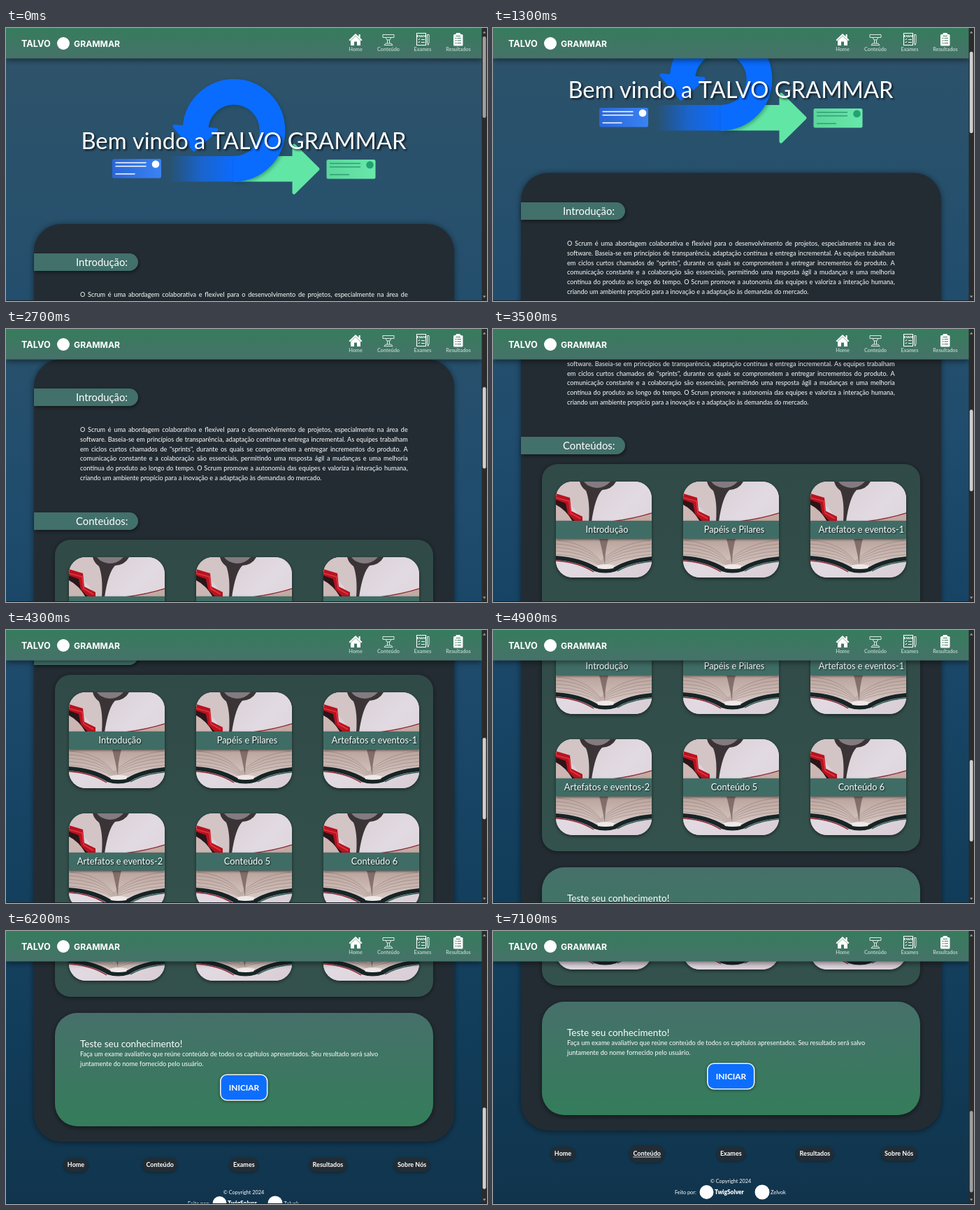
An HTML page with a canvas for the animation above (8.4 s loop, 688x390 px).

```html
<!DOCTYPE html>
<html lang="pt">
<head>
<meta charset="utf-8">
<title>Talvo Grammar</title>
<style>
html, body { margin: 0; width: 100%; height: 100%; overflow: hidden; background: #232c33; }
canvas { display: block; }
</style>
</head>
<body>
<canvas id="stage" width="688" height="390"></canvas>
<script>
const ctx = document.getElementById('stage').getContext('2d');
const W = 688, H = 390, PAGE_H = 1208, LOOP = 8400, STEP = 100;
const DARK = '#232c33', TEAL = '#46706a', GREEN = '#347d5b', WHITE = '#fff';
const LATO = 'Lato, sans-serif';

// Scroll offset over time, linear between the points
const SCROLL = [[620, 0], [1300, 73], [2700, 237], [3500, 345], [4300, 474], [5600, 704], [6300, 818]];

function scrollAt(t) {
  if (t <= SCROLL[0][0]) return 0;
  for (let i = 1; i < SCROLL.length; i++) {
    const [t0, y0] = SCROLL[i - 1], [t1, y1] = SCROLL[i];
    if (t <= t1) return Math.round(y0 + (y1 - y0) * (t - t0) / (t1 - t0));
  }
  return 818;
}

function shadow(blur, dx = 0, dy = 0, color = 'rgba(0,0,0,.5)') {
  ctx.shadowColor = color;
  ctx.shadowBlur = blur;
  ctx.shadowOffsetX = dx;
  ctx.shadowOffsetY = dy;
}

const noShadow = () => shadow(0, 0, 0, 'transparent');

function text(str, x, y, size, { weight = 400, align = 'left', color = WHITE, font = LATO } = {}) {
  ctx.font = `${weight} ${size}px ${font}`;
  ctx.textAlign = align;
  ctx.fillStyle = color;
  ctx.fillText(str, x, y);
  return ctx.measureText(str).width;
}

function justified(str, x, y, size, width) {
  ctx.font = `400 ${size}px ${LATO}`;
  const gap = (width - ctx.measureText(str).width) / (str.split(' ').length - 1);
  ctx.wordSpacing = gap + 'px';
  text(str, x, y, size);
  ctx.wordSpacing = '0px';
}

function box(x, y, w, h, r, fill) {
  ctx.beginPath();
  ctx.roundRect(x, y, w, h, r);
  ctx.fillStyle = fill;
  ctx.fill();
}

function disc(x, y, r, fill) {
  ctx.beginPath();
  ctx.arc(x, y, r, 0, 7);
  ctx.fillStyle = fill;
  ctx.fill();
}

function shape(d, fill, stroke, width = 1) {
  const p = new Path2D(d);
  if (fill) { ctx.fillStyle = fill; ctx.fill(p); }
  if (stroke) { ctx.strokeStyle = stroke; ctx.lineWidth = width; ctx.stroke(p); }
}

function fade(x0, y0, x1, y1, ...colors) {
  const g = ctx.createLinearGradient(x0, y0, x1, y1);
  colors.forEach((c, i) => g.addColorStop(i / (colors.length - 1), c));
  return g;
}

function ticket(x, y, fill, line, dot) {
  box(x, y, 70, 27.5, 2.5, fill);
  shape(`M${x + 4.5} ${y + 5.5}h44m-44 5h44m-44 11h28`, null, line, 1.6);
  disc(x + 62, y + 7.5, 5.3, dot);
}

function hero() {
  const blue = '#0a6bff', mint = '#62e6a5';
  ctx.lineJoin = ctx.lineCap = 'round';
  shape('M326 183H411V168L446 201.5L411 235V219.500H326Z', mint);
  shape('M412 168L446 201.500L412 235Z', mint, mint, 5);
  ctx.lineCap = 'butt';

  ctx.fillStyle = fade(233, 0, 326, 0, 'rgba(10,107,255,0)', 'rgba(20,108,245,.7)', blue);
  ctx.fillRect(233, 183, 94, 36.5);
  shadow(5, 2, 2, 'rgba(0,60,60,.4)');
  ctx.beginPath();
  ctx.arc(326, 146.2, 55, Math.PI, Math.PI / 2);
  ctx.strokeStyle = blue;
  ctx.lineWidth = 36.6;
  ctx.stroke();
  noShadow();
  shape('M241 140.500L301 145.500L269 174Z', blue, blue, 5);

  ticket(152, 187, fade(152, 0, 222, 0, '#2a66d8', '#3a82f2'), WHITE, WHITE);
  ticket(458.5, 188, fade(458, 0, 528, 0, '#5bd69b', '#69e8ab'), '#2f9c72', '#24a073');

  shadow(3, 2, 2, 'rgba(0,0,0,.7)');
  text('Bem vindo a TALVO GRAMMAR', 340, 172.5, 32.7, { align: 'center' });
  noShadow();
}

function heading(label, y) {
  shadow(5, 1, 2);
  box(40, y, 149, 25, [0, 12.5, 12.5, 0], '#42706a');
  noShadow();
  text(label, 100, y + 17.5, 14.8);
}

function books() {
  ctx.fillStyle = fade(0, 0, 137, 137, '#d6cbd0', '#e2dae2', '#d9cdd4');
  ctx.fillRect(0, 0, 137, 137);
  // upper volume
  shape('M0 0H38Q44 12 49 18V57H36Q30 34 0 19Z', '#d3c4c6');
  shape('M34 0H86Q80 11 66 12Q56 22 51 57H47Q49 28 43 13Q36 8 34 0Z', '#3b3436');
  shape('M40 0H78Q70 9 58 9Q46 8 40 0Z', '#837b7f');
  shape('M0 17L20 23L22 42L38 50V57H0Z', '#b8131f');
  shape('M0 26L14 31L17 46L28 57H0Z', '#2b1519');
  shape('M0 33Q14 40 24 57H0Z', '#cbb6b4');
  shape('M0 23L19 28L21 45L35 53', null, '#e23540', 1.5);
  shape('M84 57Q112 54 137 46V57Z', '#c4aaa2');
  shape('M80 57Q112 53 137 45', null, '#8f3038', 1.4);
  // lower volume
  shape('M0 80H137V107Q104 109 84 121H58Q34 108 0 106Z', fade(0, 82, 0, 122, '#b9a39c', '#d8c8c3'));
  for (let i = 0; i < 5; i++) {
    shape(`M0 ${84 + i * 5}Q42 ${86 + i * 5} 64 ${114 + i * 1.5}Q92 ${87 + i * 5} 137 ${84 + i * 5}`, null, 'rgba(95,72,70,.35)', .8);
  }
  shape('M62 82H75Q70 98 70 119Q66 96 62 82Z', 'rgba(70,50,50,.5)');
  shape('M0 106Q34 108 58 122Q70 126 84 122Q104 110 137 107V113Q104 116 86 128Q70 133 55 128Q32 114 0 112Z', '#172426');
  shape('M58 120Q70 116 84 120L82 124Q70 126 60 124Z', '#efe8e6');
  shape('M0 113Q32 115 54 129', null, '#8e2430', 1.4);
  shape('M88 128Q106 117 137 114', null, '#28584f', 1.4);
}

function topic(label, x, y) {
  shadow(5, 0, 2);
  box(x, y, 137, 137, 24, '#d9cdd4');
  noShadow();
  ctx.save();
  ctx.beginPath();
  ctx.roundRect(x, y, 137, 137, 24);
  ctx.clip();
  ctx.translate(x, y);
  books();
  shadow(3, 0, 1);
  ctx.fillStyle = '#3f6d66';
  ctx.fillRect(0, 56, 137, 25.5);
  shadow(2, 1, 1, 'rgba(0,0,0,.8)');
  text(label, 73, 73, 12.8, { align: 'center' });
  ctx.restore();
}

function quiz() {
  shadow(7, 0, 2);
  box(70, 919, 541, 162, 32, fade(0, 919, 0, 1081, TEAL, GREEN));
  noShadow();
  text('Teste seu conhecimento!', 106, 967.7, 13.5);
  text('Faça um exame avaliativo que reúne conteúdo de todos os capítulos apresentados. Seu resultado será salvo', 106, 981.4, 9.1);
  text('juntamente do nome fornecido pelo usuário.', 106, 995, 9.1);
  shadow(4, 0, 1);
  box(306, 1006.5, 68.5, 38, 10, '#eef6f4');
  noShadow();
  box(307.6, 1008.1, 65.3, 34.8, 8.5, '#0d6efd');
  text('INICIAR', 340.5, 1029.8, 11.9, { weight: 700, align: 'center' });
}

function footer(hover) {
  ['Home', 'Conteúdo', 'Exames', 'Resultados', 'Sobre Nós'].forEach((label, i) => {
    const x = 100 + i * 120.15, on = hover && i === 1;
    ctx.font = `700 9px ${LATO}`;
    const w = ctx.measureText(label).width, h = on ? 24 : 20;
    shadow(4, 0, 1, 'rgba(0,0,0,.35)');
    box(x - w / 2 - 5, 1136.3 - h / 2, w + 10, h, h / 2, DARK);
    noShadow();
    text(label, x, 1139.3, 9, { weight: 700, align: 'center' });
    if (on) ctx.fillRect(x - w / 2, 1140.5, w, .8);
  });
  text('© Copyright 2024', 340, 1178, 7.3, { align: 'center' });
  text('Feito por:', 260, 1193.5, 7.3);
  disc(305.5, 1191, 10, WHITE);
  text('TwigSolver', 317, 1193.7, 8.4, { weight: 900 });
  disc(385, 1191, 10.5, WHITE);
  text('Zelvok', 397, 1193.5, 7.5);
}

const INTRO = [
  'O Scrum é uma abordagem colaborativa e flexível para o desenvolvimento de projetos, especialmente na área de',
  'software. Baseia-se em princípios de transparência, adaptação contínua e entrega incremental. As equipes trabalham',
  'em ciclos curtos chamados de "sprints", durante os quais se comprometem a entregar incrementos do produto. A',
  'comunicação constante e a colaboração são essenciais, permitindo uma resposta ágil a mudanças e uma melhoria',
  'contínua do produto ao longo do tempo. O Scrum promove a autonomia das equipes e valoriza a interação humana,',
];
const TOPICS = ['Introdução', 'Papéis e Pilares', 'Artefatos e eventos-1', 'Artefatos e eventos-2', 'Conteúdo 5', 'Conteúdo 6'];

function page(hover) {
  ctx.fillStyle = fade(0, 0, 0, PAGE_H, '#30536a', '#28516c', '#204c6d', '#174464', '#113c59', '#11344c');
  ctx.fillRect(0, 0, W, PAGE_H);
  hero();
  shadow(8, 0, 1);
  box(40, 280, 601, 823, 39, DARK);
  noShadow();

  heading('Introdução:', 322);
  INTRO.forEach((line, i) => justified(line, 106, 384.2 + i * 13.65, 9.1, 468.7));
  text('criando um ambiente propício para a inovação e a adaptação às demandas do mercado.', 106, 452.5, 9.1);

  heading('Conteúdos:', 499);
  shadow(6, 0, 1);
  box(70, 538, 541, 358, 22, fade(0, 538, 0, 896, '#304a47', '#34524d'));
  noShadow();
  TOPICS.forEach((label, i) => topic(label, 90 + i % 3 * 182, i < 3 ? 563 : 736));
  quiz();
  footer(hover);
}

function icons() {
  // house
  shape('M490.500 17L500 8L509.500 17L508 18.500L500 11L492 18.500Z', WHITE);
  shape('M493 18L500 11.500L507 18V25H502V19.500H498V25H493Z', WHITE);
  ctx.fillRect(504.5, 9, 2.2, 5);
  // lectern
  shape('M539 9.500H555V13.500H539ZM543 13.500L545 17H549L551 13.500M545.500 17V22M548.500 17V22M541 24.500L543 22H551L553 24.500Z', null, '#dcebe5', 1);
  // exam sheet
  shape('M587.500 7.500H600.500V24.500H587.500Z', null, WHITE, 1.1);
  text('EXAM', 594, 13, 4.3, { weight: 900, align: 'center' });
  shape('M589.500 16l1 1l1.500 -2M589.500 20l1 1l1.500 -2M594 16.500h5M594 20.500h5', null, WHITE, 1);
  shape('M602.500 9.500H605V21L603.700 24.500L602.500 21Z', null, WHITE, .9);
  // clipboard
  box(640, 9, 13.5, 16.5, 1.5, WHITE);
  box(643.5, 7, 6.5, 4, 1.2, WHITE);
  shape('M642.500 14.500h2m1 0h5.500M642.500 18h2m1 0h5.500M642.500 21.500h2m1 0h5.500M643.500 11.500h6.500', null, '#3f7763', 1);
}

function header() {
  shadow(8, 0, 2);
  ctx.fillStyle = fade(0, 0, 0, 43, '#367c5d', '#467269');
  ctx.fillRect(0, 0, 681, 43.5);
  noShadow();
  const brand = { weight: 700, font: 'Inter, sans-serif' };
  text('TALVO', 22, 26.5, 12.7, brand);
  disc(82, 22, 9, WHITE);
  text('GRAMMAR', 97, 26.5, 12.2, brand);
  icons();
  [['Home', 500], ['Conteúdo', 547], ['Exames', 596], ['Resultados', 647]].forEach(([label, x]) =>
    text(label, x, 33.4, 7.3, { weight: 700, align: 'center', color: '#b4cec4' }));
}

function scrollbar(y, held) {
  ctx.fillStyle = '#2b2b2c';
  ctx.fillRect(680.5, 0, 7.5, H);
  box(681.8, 12 + y * .2995, 4.8, 116.5, 2.4, held ? '#cfcfcf' : '#9f9f9f');
  shape('M682 7.500L684.200 4.500L686.400 7.500ZM682 382.500L684.200 385.500L686.400 382.500Z', '#9f9f9f');
}

function draw(t) {
  const y = scrollAt(t);
  ctx.save();
  ctx.translate(0, -y);
  page(t >= 6800);
  ctx.restore();
  header();
  scrollbar(y, t >= 400 && t < 6500);
  ctx.fillStyle = '#1a2228';
  ctx.fillRect(0, 389, W, 1);
}

const start = performance.now();
let last = -1;

function tick() {
  const t = Math.floor((performance.now() - start) % LOOP / STEP) * STEP;
  if (t !== last) draw(last = t);
  requestAnimationFrame(tick);
}
tick();
</script>
</body>
</html>
```
